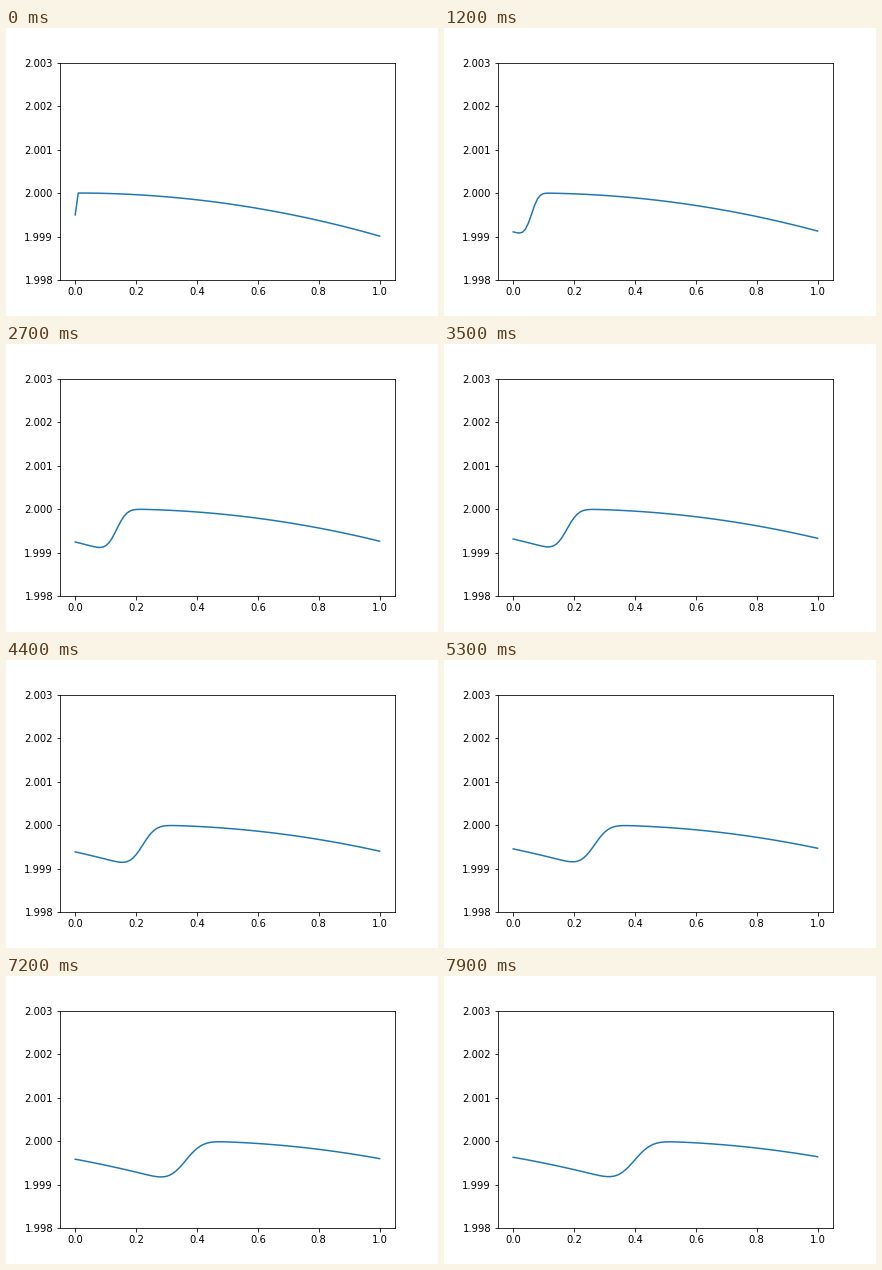
Write a matplotlib script that moves like this. It is 432 px wide and 288 px high and loops after 8000 ms.

```python
import matplotlib.pyplot as plt
import numpy as np
from matplotlib.animation import FuncAnimation

FRAMES = 80
INTERVAL = 100
COURANT = 0.5

plt.rcParams.update({"font.family": "DejaVu Sans", "font.size": 10})

x = np.linspace(0, 1, 101)


def solve(steps):
    """Periodic first-order upwind advection, started from a shallow parabola."""
    u = 2 - 0.001 * x**2
    for _ in range(steps):
        u = u - COURANT * (u - np.roll(u, 1))
    return u


fig = plt.figure(figsize=(6, 4), dpi=72, facecolor="white")
fig.subplots_adjust(left=0.125, right=0.9, bottom=0.125, top=0.88)
ax = fig.add_subplot()
ax.set_xlim(-0.05, 1.05)
ax.set_ylim(1.998, 2.003)
ax.set_xticks(np.linspace(0, 1, 6))
ax.set_yticks(np.linspace(1.998, 2.003, 6))
ax.xaxis.set_major_formatter("{x:.1f}")
ax.yaxis.set_major_formatter("{x:.3f}")
line, = ax.plot(x, solve(1), color="#1f77b4", lw=1.5)


def update(i):
    line.set_ydata(solve(i + 1))
    return line,


anim = FuncAnimation(fig, update, frames=FRAMES, interval=INTERVAL,
                     repeat=True, repeat_delay=0)
plt.show()
```
